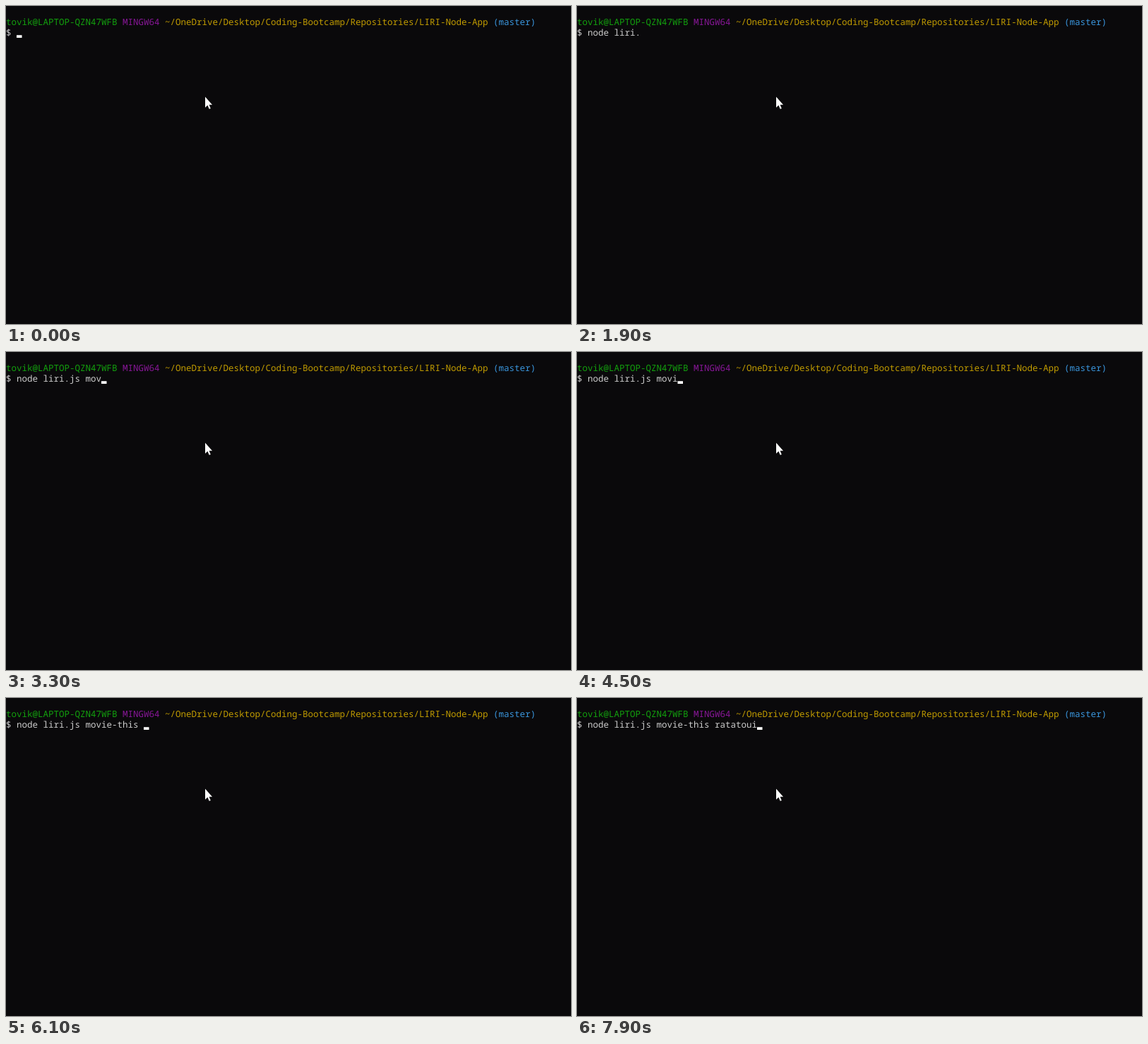
Write an HTML page that moves like this. It is 800 by 450 pixels and loops after 8 s.

```html
<!DOCTYPE html>
<html lang="en">
<head>
<meta charset="utf-8">
<style>
  html, body { margin: 0; width: 100%; height: 100%; overflow: hidden; background: #0a090b; }
  svg { display: block; }
  text {
    font: 12.5px "Noto Sans Mono", "DejaVu Sans Mono", monospace;
    font-variant-ligatures: none;
    text-rendering: geometricPrecision;
    white-space: pre;
    fill: #ccc;
  }
  .user { fill: #13a10e; }
  .system { fill: #881798; }
  .path { fill: #c19c00; }
  .branch { fill: #3a96dd; }
</style>
</head>
<body>
<svg width="800" height="450" viewBox="0 0 800 450">
  <text y="27"><tspan class="user">tovik@LAPTOP-QZN47WFB</tspan> <tspan class="system">MINGW64</tspan> <tspan class="path">~/OneDrive/Desktop/Coding-Bootcamp/Repositories/LIRI-Node-App</tspan> <tspan class="branch">(master)</tspan></text>
  <text id="line" y="42">$ </text>
  <rect id="caret" y="41.2" width="7.5" height="3.8" fill="#fff"/>
  <path d="M282 128.5V143.8L285.4 140.6L287.7 145.8L289.8 144.9L287.6 139.8H292Z" fill="#fff"/>
</svg>
<script>
const LOOP = 8000, CELL = 7.5, ERASE = '<', HIDE = '|';
const line = document.getElementById('line');
const caret = document.getElementById('caret');

// Each key has its time in tenths of a second; HIDE is the caret blinking off.
const keys = 'node liri.|js mov|e|<ie-th|is| ratatoui';
const tenths = [
  1, 2, 4, 5, 6, 8, 10, 12, 14, 17, 19, 20, 22, 24,
  29, 31, 33, 35, 37, 40, 42, 45, 46, 47, 48, 49, 51, 52, 53, 56,
  60, 64, 66, 68, 71, 73, 75, 77, 79
];
// The space before "movie" falls between "js" and "m", so every key lines up.

function draw(now) {
  const t = now % LOOP;
  let typed = '$ ', visible = true;
  for (let i = 0; i < keys.length && tenths[i] * 100 <= t; i++) {
    const key = keys[i];
    visible = key !== HIDE;
    if (key === ERASE) typed = typed.slice(0, -1);
    else if (visible) typed += key;
  }
  if (line.textContent !== typed) line.textContent = typed;
  caret.setAttribute('x', typed.length * CELL);
  caret.setAttribute('visibility', visible ? 'visible' : 'hidden');
}

const start = performance.now();
function tick() {
  draw(performance.now() - start);
  requestAnimationFrame(tick);
}
tick();
</script>
</body>
</html>
```
